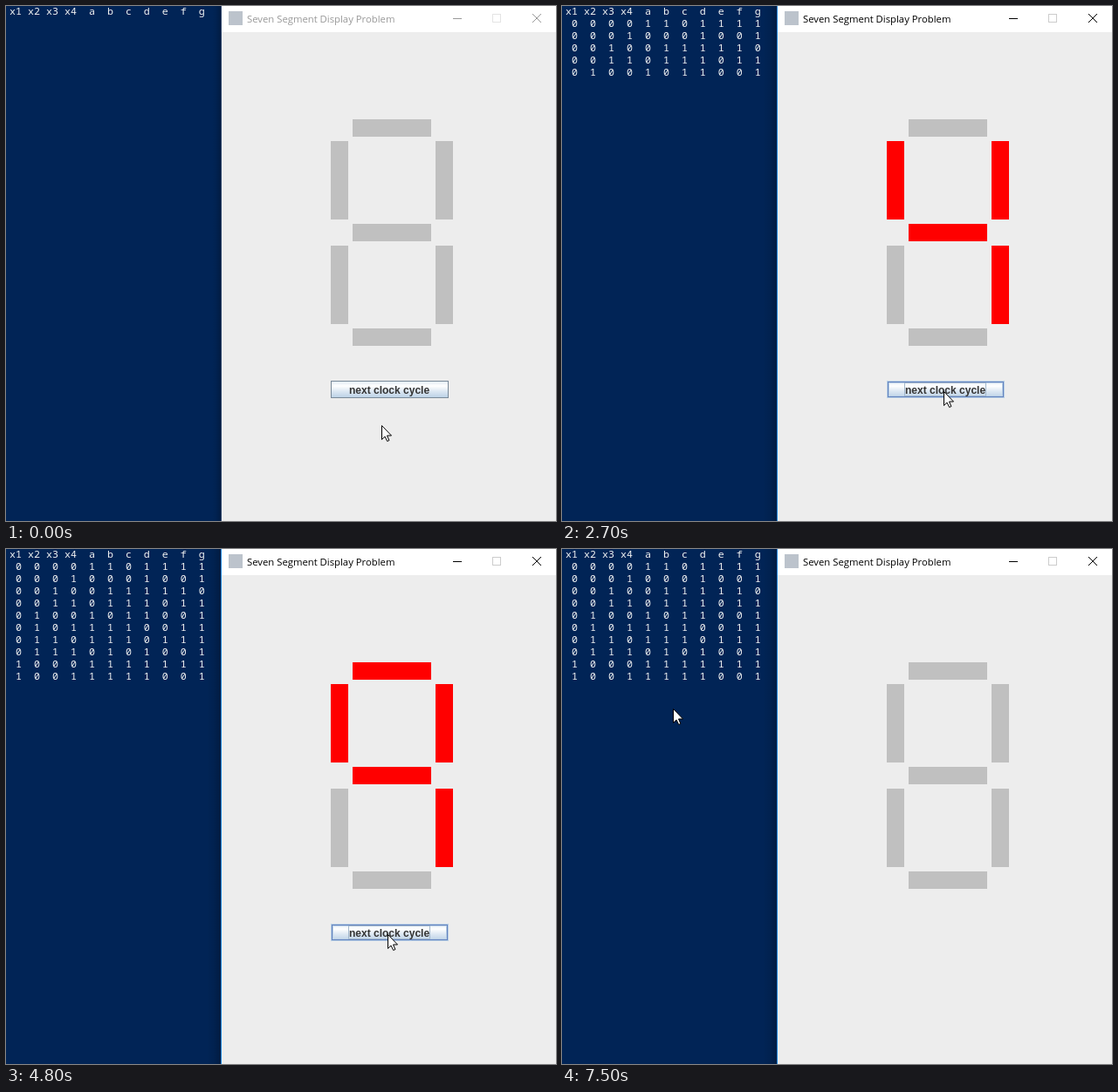
Write an HTML page with a canvas that moves like this. It is 630x591 px and loops after 7.6 s.

```html
<!DOCTYPE html>
<html lang="en">
<head>
<meta charset="utf-8">
<title>Seven Segment Display Problem</title>
<style>
  html, body { margin: 0; width: 100%; height: 100%; overflow: hidden; background: #012456; }
  canvas { display: block; }
</style>
</head>
<body>
<canvas id="stage" width="630" height="591"></canvas>
<script>
const ctx = document.getElementById('stage').getContext('2d');
const LOOP = 7600, STEP = 100;
const HOVER_AT = 500, ACTIVE_AT = 800, OFF_AT = 5200;
const MONO = '11.67px "Noto Sans Mono", "DejaVu Sans Mono", monospace';
const TITLE = '11.3px "Open Sans", "Noto Sans", sans-serif';
const LABEL = 'bold 12px "Liberation Sans", Arial, sans-serif';

// Outputs a..g of the decoder: place on the display and logic of the four inputs
const across = row => [397, 130 + 120 * row, 90, 20];
const upright = (col, row) => [372 + 120 * col, 155 + 120 * row, 20, 90];
const lowerLeft = (x1, x2, x3, x4) => !x4 && (!x2 || x3);
const SEGMENTS = [
  { box: upright(0, 0), on: (x1, x2, x3, x4) => x1 || !x3 && !x4 || x2 && !(x3 && x4) },
  { box: across(0),     on: (x1, x2, x3, x4) => x1 || x3 || x2 === x4 },
  { box: across(1),     on: (x1, x2, x3, x4) => x1 || x2 !== x3 || x3 && !x4 },
  { box: upright(1, 0), on: (x1, x2, x3, x4) => !x2 || x3 === x4 },
  { box: upright(0, 1), on: lowerLeft },
  { box: across(2),     on: (x1, x2, x3, x4) => lowerLeft(x1, x2, x3, x4) || !x2 && x3 || x2 && !x3 && x4 },
  { box: upright(1, 1), on: (x1, x2, x3, x4) => x2 || !x3 || x4 }
];
const inputs = n => [8, 4, 2, 1].map(b => n & b ? 1 : 0);
const outputs = n => SEGMENTS.map(s => s.on(...inputs(n)) ? 1 : 0);

const clamp = (v, lo, hi) => Math.min(hi, Math.max(lo, v));
const mix = (a, b, u) => a + (b - a) * u;
const progress = (t, from, to) => clamp((t - from) / (to - from), 0, 1);

// Clicks come every 400 ms, a little slower in the middle
const clickTime = i => 900 + 400 * i + 100 * clamp(i - 2, 0, 3);
const clicked = t => {
  let n = 0;
  while (n < 10 && clickTime(n) <= t) n++;
  return n;
};
const isPressed = t => [0, 5, 6, 9].some(i => clickTime(i) - t === STEP);

function rect(x, y, w, h, color) {
  ctx.fillStyle = color;
  ctx.fillRect(x, y, w, h);
}

function frame(x, y, w, h, color) {
  ctx.strokeStyle = color;
  ctx.lineWidth = 1;
  ctx.strokeRect(x + 0.5, y + 0.5, w - 1, h - 1);
}

function text(str, x, y, font, color) {
  ctx.font = font;
  ctx.fillStyle = color;
  ctx.fillText(str, x, y);
}

function line(x1, y1, x2, y2, color) {
  ctx.strokeStyle = color;
  ctx.lineWidth = 1;
  ctx.beginPath();
  ctx.moveTo(x1, y1);
  ctx.lineTo(x2, y2);
  ctx.stroke();
}

function gradient(x1, y1, x2, y2, stops) {
  const g = ctx.createLinearGradient(x1, y1, x2, y2);
  stops.forEach(([at, color]) => g.addColorStop(at, color));
  return g;
}

function drawConsole(t, active) {
  rect(0, 0, 247, 591, '#012456');
  const reach = active ? 16 : 10;
  const shade = gradient(246 - reach, 0, 246, 0,
    [[0, 'rgba(0,0,0,0)'], [0.5, 'rgba(0,0,0,.07)'], [1, 'rgba(0,0,0,.24)']]);
  rect(246 - reach, 0, reach, 591, shade);
  rect(246, 0, 1, 591, active ? '#1883d7' : '#2b4468');

  text('x1 x2 x3 x4  a  b  c  d  e  f  g', 4, 10, MONO, '#f4f4f4');
  for (let i = 0; i < clicked(t); i++) {
    const row = [...inputs(i), ...outputs(i)].join('  ');
    text(row, 11, 24 + 14 * i, MONO, '#f4f4f4');
  }
}

function drawTitleBar(active) {
  const ink = active ? '#000' : '#999';
  rect(247, 0, 383, 30, '#fff');
  rect(255, 6, 16, 16, '#bcc3cc');
  text('Seven Segment Display Problem', 276, 19, TITLE, ink);
  rect(512, 14, 10, 1, ink);
  frame(557, 9, 10, 10, active ? '#ccc' : '#e4e4e4');
  line(603, 9, 613, 19, ink);
  line(613, 9, 603, 19, ink);
}

function drawDigit(t) {
  const count = clicked(t);
  const lit = count && t < OFF_AT ? outputs(count - 1) : [];
  SEGMENTS.forEach((s, i) => rect(...s.box, lit[i] ? '#f00' : '#c0c0c0'));
}

function drawButton(t, active) {
  const x = 372, y = 430, w = 135, h = 20;
  if (isPressed(t)) {
    rect(x, y, w, h, '#7a8a99');
    rect(x + 2, y + 2, w - 3, h - 3, '#b8cfe5');
  } else {
    rect(x, y, w, h, gradient(0, y, 0, y + h,
      [[0, '#dde8f3'], [0.3, '#fff'], [0.6, '#dde8f3'], [1, '#b8cfe5']]));
    if (t >= HOVER_AT) {
      ['#b8cfe5', '#6382bf', '#b8cfe5'].forEach((color, i) =>
        frame(x + i, y + i, w - 2 * i, h - 2 * i, color));
    } else {
      frame(x, y, w, h, '#7a8a99');
    }
  }
  if (active) frame(392, 432, 94, 16, '#a3b8cc');
  text('next clock cycle', 393, 445, LABEL, '#333');
}

// Up to the button, away to the left, one turn around, then rest
function pointerAt(t) {
  if (t < 5900) {
    const u = progress(t, 300, 600);
    return [mix(430, 437, u), mix(481, 442, u)];
  }
  if (t < 6600) {
    const rest = (1 - progress(t, 5900, 6400)) ** 2;
    return [mix(157, 282, rest), mix(215, 295, rest)];
  }
  if (t < 7500) {
    const angle = mix(0.8, 5, progress(t, 6600, 7300));
    return [138 + 19 * Math.cos(angle), 201 + 30 * Math.sin(angle)];
  }
  return [127, 183];
}

function drawPointer(t) {
  const [x, y] = pointerAt(t).map(Math.round);
  ctx.save();
  ctx.translate(x + 0.5, y + 0.5);
  const arrow = new Path2D('M0 0V16L3.6 12.6L6.2 18L8.4 17L6 11.5H11Z');
  ctx.lineJoin = 'round';
  ctx.lineWidth = 1;
  ctx.fillStyle = '#fff';
  ctx.strokeStyle = '#000';
  ctx.fill(arrow);
  ctx.stroke(arrow);
  ctx.restore();
}

function draw(t) {
  const active = t >= ACTIVE_AT;
  drawConsole(t, active);
  rect(247, 30, 383, 561, '#ededed');
  drawTitleBar(active);
  drawDigit(t);
  if (t < OFF_AT) drawButton(t, active);
  drawPointer(t);
}

const start = performance.now();
function tick() {
  const t = (performance.now() - start) % LOOP;
  draw(Math.floor(t / STEP) * STEP);
  requestAnimationFrame(tick);
}
tick();
</script>
</body>
</html>
```
